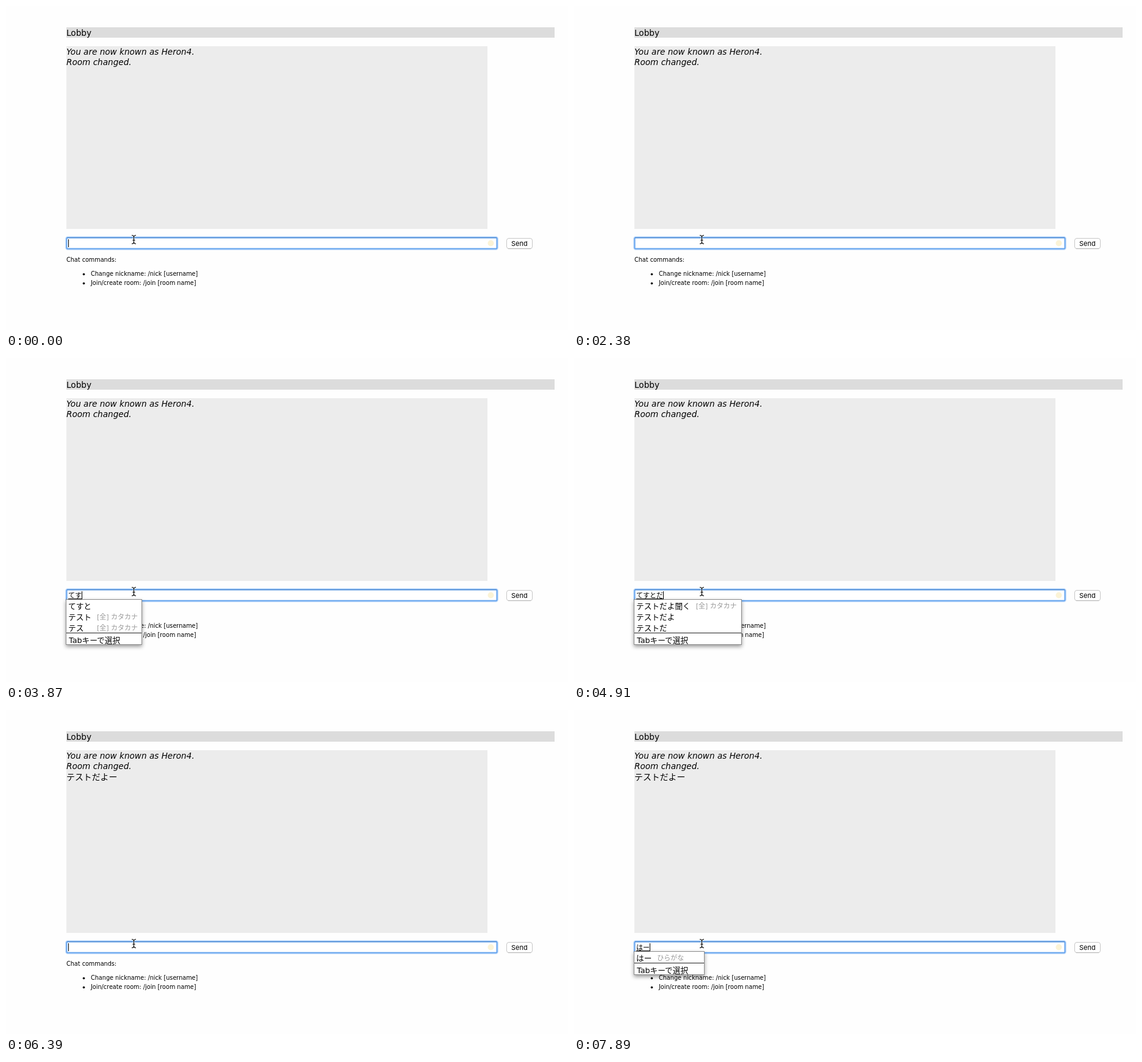
Animation of 921 by 532 pixels, one loop 8 s. Source, as an HTML page:

```html
<!DOCTYPE html>
<html lang="ja">
<head>
<meta charset="utf-8">
<title>Chat</title>
<style>
  html, body { margin: 0; width: 100%; height: 100%; overflow: hidden; background: #fefefe; }
  svg { display: block; width: 100%; height: 100%; }
  text { font-family: "DejaVu Sans", "Noto Sans CJK JP", "Noto Sans CJK", sans-serif; fill: #000; white-space: pre; }
  .body { font-size: 13.6px; }
  .said { font-size: 13.9px; }
  .note { font-style: italic; }
  .small { font-size: 9.67px; }
  .button { font: 11px Inter, "Liberation Sans", sans-serif; }
  .typed { font-size: 11px; }
  .row { font-size: 12.7px; }
  .kind { font-size: 11px; fill: #999; }
  .panel { fill: #fff; stroke: #8c8c8c; filter: drop-shadow(0 3px 3px rgba(0, 0, 0, .4)); }
</style>
</head>
<body>
<svg viewBox="0 0 921 532">
  <rect x="99" y="35" width="800" height="17" fill="#dcdcdc"/>
  <text class="body" x="99" y="49">Lobby</text>

  <rect x="99" y="66" width="690" height="300" fill="#ececec"/>
  <text class="body note" x="99" y="80">You are now known as Heron4.</text>
  <text class="body note" x="99" y="97">Room changed.</text>
  <text class="said" id="said" x="99" y="115"></text>

  <g fill="none">
    <rect x="99.5" y="380.5" width="705" height="18" rx="2" stroke="#3b8df0" stroke-opacity=".28" stroke-width="5"/>
    <rect x="99.5" y="380.5" width="705" height="18" rx="1" stroke="#64a3ee" stroke-width="2" fill="#fff"/>
    <path d="M100 380.5H804" stroke="#4482cc"/>
  </g>
  <circle cx="794.5" cy="389.5" r="5" fill="#fbf3d6"/>

  <rect x="820.5" y="381.5" width="42" height="17" rx="3.5" fill="#fff" stroke="#c6c6c6"/>
  <path d="M823 398.5H860" stroke="#adadad"/>
  <text class="button" x="828" y="394">Send</text>

  <text class="small" x="99" y="420">Chat commands:</text>
  <circle cx="127.5" cy="440.5" r="1.8"/>
  <text class="small" x="139" y="443">Change nickname: /nick [username]</text>
  <circle cx="127.5" cy="455.5" r="1.8"/>
  <text class="small" x="139" y="458">Join/create room: /join [room name]</text>

  <text class="typed" id="typed" x="102" y="394"></text>
  <rect id="underline" x="102" y="395" height="1"/>
  <rect id="caret" y="383" width="1" height="13"/>
  <g id="popup"></g>

  <path d="M206 376.5Q209.5 376.5 209.5 379.5Q209.5 376.5 213 376.5M209.5 378.5V388.5M206 390.5Q209.5 390.5 209.5 387.5Q209.5 390.5 213 390.5M207.5 384.5H211.5"
        fill="none" stroke="#fff" stroke-width="2.4" stroke-opacity=".6"/>
  <path d="M206 376.5Q209.5 376.5 209.5 379.5Q209.5 376.5 213 376.5M209.5 378.5V388.5M206 390.5Q209.5 390.5 209.5 387.5Q209.5 390.5 213 390.5M207.5 384.5H211.5"
        fill="none" stroke="#000" stroke-width="1.1"/>
</svg>
<script>
const LOOP = 8000;
const KATA = "|[全] カタカナ";
const LISTEN = "テストだよ聞く" + KATA;
const SAID = "テストだよー";

const idle = (at, caret, said = "") => ({ at, caret, said, input: "" });
const typing = (at, input, right, rows, said = "") =>
  ({ at, input, right, rows, said, caret: true, composing: true });

const steps = [
  idle(0, true), idle(450, false), idle(900, true),
  idle(1490, false), idle(1940, true), idle(2380, false),
  typing(2830, "ｈ", 252, ["はじめましてこんにちは", "本日は", "はい"]),
  typing(2980, "は", 214, ["はい", "はじめ"]),
  idle(3280, true),
  typing(3570, "ｔ", 230, ["天気がいいですから", "とても", "ところで"]),
  typing(3720, "て", 214, ["ている", "テスト", "天気"]),
  typing(3870, "てす", 223, ["てすと", "テスト" + KATA, "テス" + KATA]),
  typing(4160, "てすｔ", 223, ["てすと", "テスト" + KATA, "テスト"]),
  typing(4310, "てすと", 279, ["てすと", "テスト", LISTEN]),
  typing(4610, "てすとｄ", 282, [LISTEN, "テストだよ", "テストです"]),
  typing(4910, "てすとだ", 275, [LISTEN, "テストだよ", "テストだ"]),
  typing(5060, "てすとだｙ", 275, [LISTEN, "テストだよ", "テストだよね"]),
  typing(5200, "てすとだよ", 284, [LISTEN, "テストだよ"]),
  typing(5350, "てすとだよ", 275, [LISTEN, "テストだよ"]),
  typing(5800, "てすとだよー", 284, ["テストだよー聞く" + KATA, SAID]),
  { at: 5950, input: SAID, caret: true, composing: true, said: "" },
  { at: 6240, input: SAID, caret: true, said: "" },
  idle(6390, true, SAID), idle(6990, false, SAID),
  typing(7440, "ｈ", 252, ["はじめましてこんにちは", "本日は", "はい"], SAID),
  typing(7590, "は", 214, ["はい", "はじめ"], SAID),
  typing(7890, "はー", 214, ["はー|ひらがな"], SAID),
];

const el = id => document.getElementById(id);
const label = (cls, x, y, s) => `<text class="${cls}" x="${x}" y="${y}">${s}</text>`;

function popup({ rows, right }) {
  if (!rows) return "";
  const top = 397, left = 98;
  const bottom = top + 20 + rows.length * 18;
  const items = rows.map(r => r.split("|"));
  const column = 110.8 + 12.7 * Math.max(...items.map(i => i[0].length));
  let out = `<rect class="panel" x="${left + .5}" y="${top - .5}" width="${right - left - 1}" height="${bottom - top}"/>`;
  items.forEach(([word, kind], i) => {
    const y = 411.7 + 18 * i;
    out += label("row", 102, y, word);
    if (kind) out += label("kind", column, y - .7, kind);
  });
  out += `<rect x="${left + 1}" y="${bottom - 20}" width="${right - left - 2}" height="1" fill="#222"/>`;
  return out + label("row", 103, bottom - 3.2, "Tabキーで選択");
}

function draw(step) {
  const width = 11 * step.input.length;
  el("said").textContent = step.said;
  el("typed").textContent = step.input;
  el("underline").setAttribute("width", step.composing ? width : 0);
  el("caret").setAttribute("x", 102 + width);
  el("caret").setAttribute("visibility", step.caret ? "visible" : "hidden");
  el("popup").innerHTML = popup(step);
}

let shown;
const start = performance.now();
function tick() {
  const t = (performance.now() - start) % LOOP;
  const step = steps.filter(s => s.at <= t).pop();
  if (step !== shown) draw(shown = step);
  requestAnimationFrame(tick);
}
tick();
</script>
</body>
</html>
```
